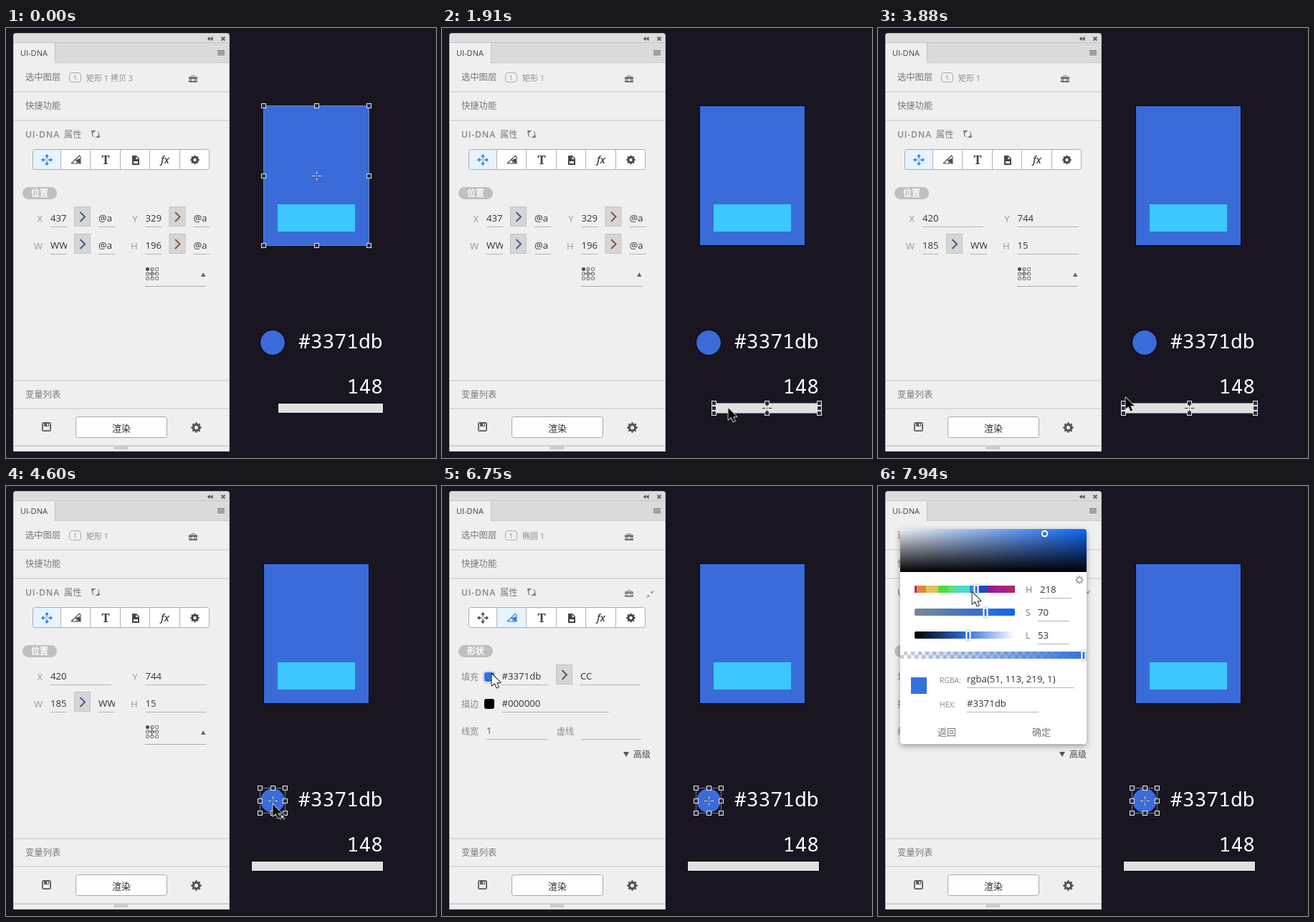
Recreate the animation shown at these times as an HTML page with a canvas. Size 600 by 600 pixels, loop 8 s.

```html
<!DOCTYPE html>
<html lang="zh">
<head>
<meta charset="utf-8">
<style>
html, body { margin: 0; width: 100%; height: 100%; overflow: hidden; background: #191622; }
canvas { display: block; width: 600px; height: 600px; }
</style>
</head>
<body>
<canvas id="stage" width="600" height="600"></canvas>
<script>
const c = document.getElementById('stage').getContext('2d');
const LOOP = 8000;
const SANS = '"Open Sans","Noto Sans CJK SC","Noto Sans CJK JP",sans-serif';
const MONO = '"Noto Sans Mono",monospace';
const SERIF = '"Noto Serif",serif';
const BLUE = '#3b6bd8', BG = '#191622', PANEL = '#efefef';

// Screen updates arrive in bursts: [first, last, count]
const BURSTS = [[300, 1280, 9], [1430, 1910, 5], [2000, 2310, 4], [2550, 3010, 6], [3480, 3480, 1],
  [3810, 4600, 9], [4760, 4830, 2], [4920, 5550, 8], [5710, 5880, 2], [6020, 6750, 8],
  [7060, 7060, 1], [7370, 7940, 6]];

// Pointer path: [time, x, y]
const PATH = [[300, 489, 562], [900, 388, 526], [1280, 398, 529], [1910, 399, 530], [2310, 380, 530],
  [2550, 376, 526], [3010, 343, 522], [3480, 340, 522], [3810, 345, 515], [4500, 372, 444],
  [4600, 372, 444], [4760, 374, 470], [4830, 372, 508], [4920, 350, 551], [5380, 110, 230],
  [5460, 86, 184], [5550, 86, 184], [5710, 92, 215], [5880, 106, 262], [6020, 104, 263],
  [6600, 69, 262], [7060, 69, 262], [7370, 72, 255], [7940, 131, 148]];

function snap(t) {
  let s = 0;
  for (const [a, b, n] of BURSTS) {
    if (t < a) break;
    const gap = n > 1 ? (b - a) / (n - 1) : 1;
    s = Math.min(b, a + Math.floor((t - a) / gap + 1e-6) * gap);
  }
  return s;
}

function pointer(t) {
  let i = 1;
  while (i < PATH.length - 1 && PATH[i][0] < t) i++;
  const [t0, x0, y0] = PATH[i - 1], [t1, x1, y1] = PATH[i];
  const k = Math.max(0, Math.min(1, (t - t0) / (t1 - t0)));
  return [Math.round(x0 + (x1 - x0) * k), Math.round(y0 + (y1 - y0) * k)];
}

// Drawing helpers
function box(x, y, w, h, col) { c.fillStyle = col; c.fillRect(x, y, w, h); }

function round(x, y, w, h, r, fill, line) {
  c.beginPath();
  c.roundRect(x, y, w, h, r);
  if (fill) { c.fillStyle = fill; c.fill(); }
  if (line) { c.strokeStyle = line; c.lineWidth = 1; c.stroke(); }
}

function text(s, x, y, size, col, align = 'left', style = '', family = SANS) {
  c.font = `${style} ${size}px ${family}`;
  c.textAlign = align;
  c.fillStyle = col;
  c.fillText(s, x, y);
}

function trace(pts, x = 0, y = 0) {
  c.beginPath();
  for (let i = 0; i < pts.length; i += 2) c.lineTo(x + pts[i], y + pts[i + 1]);
}

function poly(pts, col, x, y) { trace(pts, x, y); c.closePath(); c.fillStyle = col; c.fill(); }

function line(pts, col, w = 1, x = 0, y = 0) {
  trace(pts, x, y);
  c.strokeStyle = col; c.lineWidth = w; c.stroke();
}

function disc(x, y, r, col) { c.beginPath(); c.arc(x, y, r, 0, 7); c.fillStyle = col; c.fill(); }

function ring(x, y, r, col, w) {
  c.beginPath(); c.arc(x, y, r, 0, 7);
  c.strokeStyle = col; c.lineWidth = w; c.stroke();
}

function gear(x, y, r, col) {
  ring(x, y, r * 0.58, col, r * 0.45);
  for (let i = 0; i < 8; i++) {
    const a = i * Math.PI / 4, u = Math.cos(a), v = Math.sin(a);
    line([u * r * 0.7, v * r * 0.7, u * r, v * r], col, r * 0.36, x, y);
  }
}

function fade(a, draw) { c.save(); c.globalAlpha = a; draw(); c.restore(); }

function toolbox(x, y, col) {
  round(x - 6, y - 3, 12, 8, 1, col);
  round(x - 2.5, y - 4.5, 5, 3, 1, null, col);
  box(x - 6, y + 1, 12, 1, PANEL);
  box(x - 1, y, 2, 3, PANEL);
}

function cross4(x, y, r, col) {
  for (let i = 0; i < 4; i++) {
    c.save();
    c.translate(x, y);
    c.rotate(i * Math.PI / 2);
    poly([0, -r, -3, -r + 3.5, 3, -r + 3.5], col, 0, 0);
    line([0, -r + 3, 0, -1.5], col, 1.4);
    c.restore();
  }
}

// Panel parts
function pill(s, y) {
  round(23, y - 9, 48, 17, 8.5, '#bfbfbf');
  text(s, 47, y + 4, 12, '#fff', 'center', 'bold');
}

function arrowBtn(x, y, col) {
  round(x + .5, y + .5, 22, 27, 0, '#d5d5d5', '#c2c2c2');
  line([x + 8.5, y + 8, x + 15, y + 14.5, x + 8.5, y + 21], col, 2);
}

function input(x, w, y, s, col = '#333') {
  c.save();
  c.beginPath(); c.rect(x, y - 18, w, 24); c.clip();
  text(s, x, y, 13.2, col);
  c.restore();
  box(x, y + 7, w, 1, '#b4b4b4');
}

function field(label, x, y, val, expr, col) {
  text(label, x - 11, y + 1, 13, '#999', 'right');
  if (!expr) return input(x, 85, y, val);
  input(x, 23, y, val);
  arrowBtn(x + 33, y - 21, col);
  input(x + 67, 23, y, expr);
}

function position([X, Y, W, H], ex) {
  const cold = '#425c84', warm = '#80593f';
  pill('位置', 231);
  field('X', 62, 270, X, ex[0], cold);
  field('Y', 194.5, 270, Y, ex[1], warm);
  field('W', 62, 308, W, ex[2], cold);
  field('H', 194.5, 308, H, ex[3], warm);
  for (let i = 0; i < 9; i++) {
    const x = 195.5 + i % 3 * 6.5, y = 334.5 + Math.floor(i / 3) * 6.5;
    round(x, y, 4, 4, 1, i ? null : '#444', '#5b6068');
  }
  line([198, 342.5, 210, 342.5], '#777');
  line([203.5, 336, 203.5, 349], '#777');
  box(194, 360, 85, 1, '#a8a8a8');
  poly([272, 347, 278.5, 347, 275.2, 341], '#666');
}

function shape(dy, live) {
  c.save();
  c.translate(0, dy);
  pill('形状', 231);
  text('填充', 27, 271, 12, '#888');
  if (live) round(57.5, 258.5, 17, 17, 4, '#dfe8f5', '#c2cde0');
  round(59, 260, 14, 13, 3, '#3371db');
  input(83.5, 64.5, 270, '#3371db');
  arrowBtn(159, 249, '#4c5873');
  input(193, 84, 270, 'CC');
  text('描边', 27, 309, 12, '#888');
  round(59, 297, 14, 14, 3, '#000');
  input(83.5, 149.5, 308, '#000000');
  text('线宽', 27, 347, 12, '#888');
  input(62, 85, 346, '1', '#355f92');
  text('虚线', 160, 347, 12, '#888');
  input(194, 85, 346, '');
  poly([253, 371, 261, 371, 257, 378], '#555');
  text('高级', 267, 379, 12, '#444');
  c.restore();
}

function tabs(active) {
  const xs = [37, 77, 118, 160, 201, 243, 284];
  const ink = i => i === active ? '#2f7bd8' : '#444';
  round(37.5, 169.5, 246, 28, 3, '#fff');
  box(xs[active], 170, xs[active + 1] - xs[active], 28, '#e7f3fe');
  round(37.5, 169.5, 246, 28, 3, null, '#acacac');
  for (let i = 1; i < 6; i++) box(xs[i] - 1, 170, 1, 28, '#b4b4b4');
  cross4(57, 184, 8, ink(0));
  const s = ink(1);
  line([91, 189, 102.5, 178, 104, 180, 104, 189, 91, 189], s, 1.1);
  line([97, 183, 100, 189], s, 1.1);
  poly([98, 184, 103, 182, 104, 189, 101, 188], s);
  text('T', 139, 190, 17, ink(2), 'center', 'bold', SERIF);
  poly([176, 178, 182, 178, 186, 182, 186, 191, 176, 191], ink(3));
  poly([181.5, 179.5, 181.5, 183, 185, 183], '#fff');
  box(178, 186, 6, 3, '#fff');
  text('fx', 222, 189, 14, ink(4), 'center', 'italic 600');
  gear(263.5, 184, 6.2, ink(5));
}

function frame(layer, active, hover) {
  round(10, 7, 302, 584, [4, 4, 0, 0], '#c4c4c4');
  round(11, 8, 300, 582, [3, 3, 0, 0], PANEL);
  round(11, 8, 300, 12, [3, 3, 0, 0], '#dcdcdc');
  box(11, 20, 300, 1, '#c6c6c6');
  box(68, 21, 243, 28, '#dadada');
  box(68, 21, 1, 28, '#c4c4c4');
  box(69, 48, 242, 1, '#cccccc');
  for (const x of [281, 285]) poly([x, 15, x + 3.5, 12, x + 3.5, 18], '#444');
  line([300.5, 12.5, 305.5, 17.5], '#666', 1.8);
  line([305.5, 12.5, 300.5, 17.5], '#666', 1.8);
  for (let y = 31; y < 39; y += 2) box(295, y, 10, 1, '#666');
  text('UI-DNA', 20, 39, 11, '#444');

  text('选中图层', 27, 73, 12.3, '#777', 'left', '500');
  round(88.5, 62.5, 16, 13, 3.5, null, '#b0aca8');
  text('1', 96.5, 73, 9, '#b08858', 'center');
  text(layer, 112, 73.5, 11, '#8c8c8c');
  toolbox(261, 71, '#777');
  text('快捷功能', 27, 113, 12.3, '#777');
  c.letterSpacing = '0.8px';
  text('UI-DNA', 27, 153, 12.2, '#858585', 'left', '600');
  c.letterSpacing = '0px';
  text('属性', 81, 153, 12.2, '#777', 'left', '500');
  c.beginPath(); c.arc(125, 148, 4.6, -0.9, 1.6);
  c.strokeStyle = '#777'; c.lineWidth = 1.2; c.stroke();
  c.beginPath(); c.arc(125, 148, 4.6, 2.2, 4.7); c.stroke();
  poly([119, 143, 124, 143, 120, 147.5], '#777');
  poly([131, 153, 126, 153, 130, 148.5], '#777');
  if (hover) {
    toolbox(261, 150, '#888');
    for (const k of [1, -1]) {
      line([290.5 + k * 5, 151 - k * 5, 290.5 + k * 2, 151 - k * 2], '#999', 1.3);
      poly([k, -k, k * 4.5, -k, k, -k * 4.5], '#999', 290.5, 151);
    }
  }
  for (const y of [88, 128, 491, 530]) box(11, y, 300, 2, '#dadada');
  tabs(active);

  text('变量列表', 27, 516, 12.3, '#777');
  round(97.5, 542.5, 127, 29, 3, '#fdfdfd', '#a8a8a8');
  text('渲染', 161, 563, 13, '#333', 'center');
  round(50.5, 550.5, 12, 12, 1, null, '#5c5c5c');
  round(51.5, 551.5, 10, 10, 0, null, '#777');
  box(53, 551, 7, 5, '#5c5c5c');
  box(57, 552, 2, 3, PANEL);
  gear(265.5, 557.5, 7.2, '#555');
  box(11, 582, 300, 2, '#cfcfcf');
  for (let x = 151; x < 171; x += 2) box(x, 584, 1, 4, '#aaa');
}

// Colour picker
function ramp(x0, x1, ...cols) {
  const g = c.createLinearGradient(x0, 0, x1, 0);
  cols.forEach((col, i) => g.addColorStop(i / (cols.length - 1), col));
  return g;
}

function knob(x, y) {
  round(x - 3.5, y - 7.5, 7, 15, 1.5, '#fff', '#bcc8dc');
  box(x - 1.5, y - 5, 3, 10, '#3371db');
}

function picker() {
  c.save();
  c.shadowColor = 'rgba(0,0,0,.35)'; c.shadowBlur = 9; c.shadowOffsetY = 3;
  round(31, 60, 260, 300, 4, '#fff');
  c.restore();
  c.save();
  c.beginPath(); c.roundRect(31, 60, 260, 300, 4); c.clip();
  box(31, 60, 260, 60, ramp(31, 291, '#eef0f3', '#0f66f5'));
  const shade = c.createLinearGradient(0, 60, 0, 120);
  shade.addColorStop(0, 'rgba(0,0,0,0)');
  shade.addColorStop(1, '#000');
  box(31, 60, 260, 60, shade);
  for (let i = 0; i < 52; i++) for (let j = 0; j < 2; j++)
    if ((i + j) % 2) box(31 + i * 5, 231 + j * 5, 5, 5, '#ccc');
  box(31, 231, 260, 10, ramp(31, 291, 'rgba(51,113,219,0)', '#3371db'));
  c.restore();
  ring(232.5, 66.5, 3.8, '#fff', 2);
  gear(281, 131, 6, '#b4b8bc');

  const hues = [[51, '#c2207a'], [54, '#dc8a30'], [67, '#e6c05a'], [84, '#48dc44'], [98, '#5ee070'], [107, '#48d8cc'],
    [128, '#3388e0'], [140, '#1f4ab8'], [153, '#961a9e'], [164, '#a81e8c'], [178, '#b42468']];
  hues.forEach(([x, col], i) => box(x, 139, (i < 10 ? hues[i + 1][0] : 191) - x, 10, col));
  round(51, 171, 140, 10, 2, ramp(51, 191, '#7c8696', '#4474c0', '#0f66f5'));
  round(51, 203, 140, 10, 2, ramp(51, 191, '#000', '#2d6ad8', '#fff'));
  knob(137, 144.5); knob(150, 176.5); knob(126, 208.5); knob(287, 236.5);
  [['H', '218', 226], ['S', '70', 223], ['L', '53', 223]].forEach(([k, v, x], i) => {
    text(k, 206, 149 + i * 32, 12.5, '#777');
    input(x, 44, 149 + i * 32, v);
  });
  box(46, 267, 22, 23, '#3371db');
  text('RGBA:', 86, 275, 10.4, '#888');
  input(124, 150, 274, 'rgba(51, 113, 219, 1)');
  text('HEX:', 86, 309, 10.4, '#888');
  input(124, 100, 308, '#3371db');
  text('返回', 96, 348, 13, '#777', 'center');
  text('确定', 228, 348, 13, '#777', 'center');
}

// Artboard
function select(x, y, w, h, mark) {
  round(x + .5, y + .5, w - 1, h - 1, 0, null, '#7c7f8c');
  for (const i of [0, 1, 2]) for (const j of [0, 1, 2]) {
    if (i === 1 && j === 1) continue;
    const hx = Math.round(x + i * (w - 1) / 2) - 3, hy = Math.round(y + j * (h - 1) / 2) - 3;
    box(hx, hy, 7, 7, '#e4e6ec');
    box(hx + 1, hy + 1, 5, 5, '#2b2d3c');
  }
  const mx = Math.floor(x + w / 2), my = Math.floor(y + h / 2);
  for (const d of [-5, -3, 0, 3, 5]) {
    box(mx + d - (d < 0), my, d ? 2 : 1, 1, mark);
    box(mx, my + d - (d < 0), 1, d ? 2 : 1, mark);
  }
}

function artboard(t, width) {
  box(359, 108, 148, 196, '#06060c');
  box(360, 109, 146, 194, BLUE);
  box(379, 246, 108, 38, '#3cc8ff');
  disc(372, 439, 18, '#06060c');
  disc(372, 439, 17, BLUE);
  text('#3371db', 525.5, 447, 28, '#fff', 'right', '', MONO);
  text('148', 526, 510, 28, '#fff', 'right', '', MONO);
  const x = 527 - width;
  box(x, 523, width, 15, '#06060c');
  box(x + 1, 524, width - 2, 13, '#e0e0de');
  if (t < 1430) select(359, 108, 148, 196, '#e0e0c8');
  else if (t < 4500) select(x, 523, width, 15, '#222');
  else select(354, 421, 36, 36, '#dfe070');
}

function arrow(x, y, fill, edge) {
  const p = [0, 0, 0, 16, 4, 12.5, 7, 19, 9.5, 18, 6.7, 11.8, 12, 11.8];
  c.lineJoin = 'round';
  trace(p, x + .5, y + .5);
  c.closePath();
  c.strokeStyle = edge; c.lineWidth = 1.8; c.stroke();
  c.fillStyle = fill; c.fill();
  c.lineJoin = 'miter';
}

function resizer(x, y) {
  const p = [-9, 0, -4, -5, -4, -1.5, 4, -1.5, 4, -5, 9, 0, 4, 5, 4, 1.5, -4, 1.5, -4, 5];
  trace(p, x + .5, y + .5);
  c.closePath();
  c.strokeStyle = '#fff'; c.lineWidth = 2; c.stroke();
  c.fillStyle = '#000'; c.fill();
}

function drawPointer(t) {
  if (t < 300) return;
  const [x, y] = pointer(t);
  if (t >= 2300 && t < 3810) return resizer(x, y);
  if (x < 312) return arrow(x, y, '#fff', '#111');
  arrow(x, y, '#000', '#d8d8d8');
  if (t >= 4400 && t < 4760) {
    disc(x + 13.5, y + 17.5, 4.5, '#ddd');
    cross4(x + 13.5, y + 17.5, 5.5, '#222');
  }
}

function tip(t, width) {
  if (t < 2550 || t >= 3810) return;
  const [x, y] = pointer(t);
  round(x + 16.5, y - 35.5, 77, 21, 4, '#07070a', '#4a4a4c');
  text(`W： ${width} 像素`, x + 24, y - 21.5, 10, '#fff');
}

function draw(now) {
  const t = snap(now);
  const width = t < 2550 ? 148 : t < 3480 ? Math.round(150 + 32 * (t - 2550) / 460) : 185;
  const layer = t < 1780 ? '矩形 1 拷贝 3' : t < 4760 ? '矩形 1' : '椭圆 1';
  box(0, 0, 600, 600, BG);
  artboard(t, width);
  frame(layer, t < 5540 ? 0 : 1, t >= 5280);

  if (t < 2000) position(['437', '329', 'WW', '196'], ['@a', '@a', '@a', '@a']);
  else if (t < 3810) position(['457', '744', '148', '15'], ['', '', 'WW', '']);
  else if (t < 4830) position(['420', '744', '185', '15'], ['', '', 'WW', '']);
  else {
    const out = t < 5540 ? 1 : t < 5710 ? 0.65 : 0.25;
    if (t < 5880) fade(out, () => position(['432', '642', '36', '36'], []));
    if (t >= 5880) shape(0, t >= 6400);
    else if (t >= 5540) fade(t < 5710 ? 0.42 : 0.8, () => shape(106));
  }
  if (t >= 7060) picker();
  tip(t, width);
  drawPointer(t);
}

function tick() {
  draw(performance.now() % LOOP);
  requestAnimationFrame(tick);
}
tick();
</script>
</body>
</html>
```
